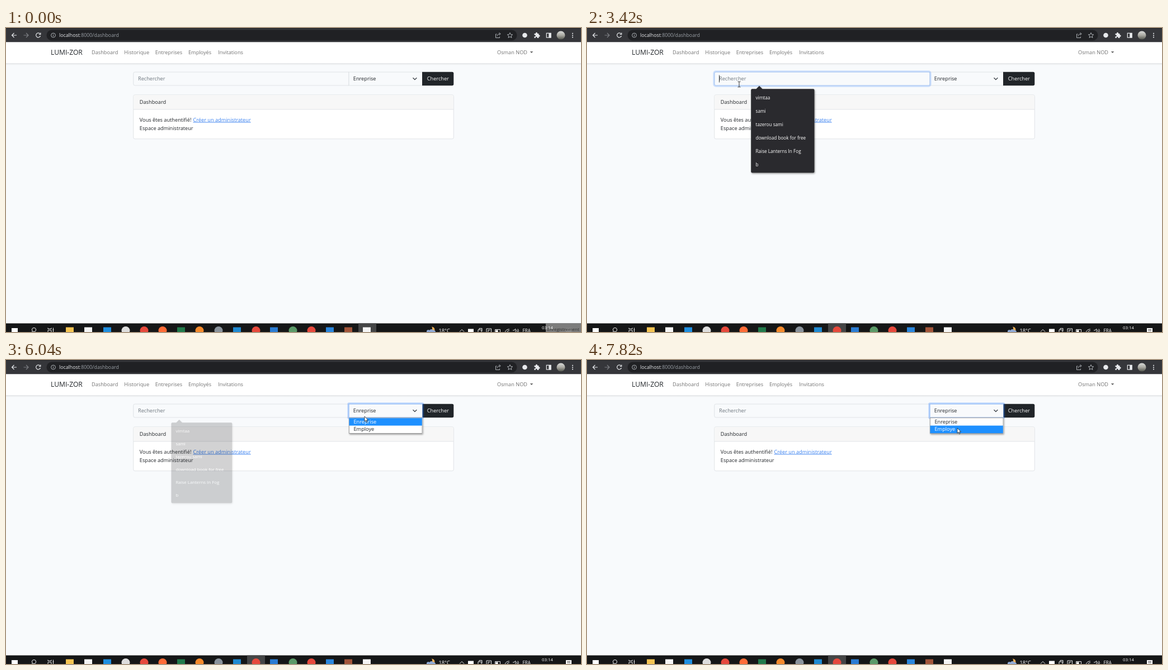
Recreate the animation shown at these times as an HTML page. Size 1028 px wide and 545 px high, loop 8000 ms.

```html
<!DOCTYPE html>
<html lang="fr">
<head>
<meta charset="utf-8">
<title>Dashboard</title>
<style>
html, body { margin: 0; width: 100%; height: 100%; overflow: hidden; background: #f8fafc; }
svg { display: block; width: 1028px; height: 545px; }
text { font: 9.2px "Open Sans", "Noto Sans", sans-serif; fill: #212529; white-space: pre; }
.brand { font-size: 12.1px; }
.nav text { fill: #737373; }
.url { font-size: 8.8px; fill: #9aa0a6; }
.hint { fill: #6c757d; }
.light, .light text { fill: #fff; }
.small text, text.small { font-size: 8.2px; }
.line { fill: none; stroke: #e8eaed; stroke-width: 1.2; }
.thin { fill: none; stroke: #fff; stroke-width: .9; }
.edge { stroke: #d5d9dd; stroke-width: .7; }
.ring rect { fill: none; stroke: #86b7fe; stroke-width: .8; }
.ring rect:first-child { stroke: rgba(13, 110, 253, .25); stroke-width: 2.7; }

/* Hard switches */
.cut { animation: 8s step-end infinite; }
#record { animation-name: record; }
#browser { animation-name: browser; }
#arrow { animation-name: arrow; }
#beam { animation-name: beam; }
#halo { animation-name: halo; }
#selection { animation-name: selection; }
#caret { animation-name: caret; }
#popup { animation-name: popup; }
#options { animation-name: options; }
#first { animation-name: first; }
#second { animation-name: second; }

/* Continuous motion */
.run { animation: 8s linear infinite; }
#pointer { animation-name: pointer; }
#reach { animation-name: reach; }
#inputRing { animation-name: inputRing; }
#selectRing { animation-name: selectRing; }
#history { animation-name: history; transform-origin: 350px 184px; }

@keyframes record { 0% { opacity: 1 } 4%, 100% { opacity: 0 } }
@keyframes browser { 0% { transform: translateX(199px) } 24.375%, 100% { transform: none } }
@keyframes arrow {
  0% { opacity: 0 } .875% { opacity: 1 } 20.5% { opacity: 0 } 33.7% { opacity: 1 }
  40.3% { opacity: 0 } 70.9% { opacity: 1 } 100% { opacity: 1 }
}
@keyframes beam {
  0% { opacity: 0 } 20.5% { opacity: 1 } 33.7% { opacity: 0 }
  40.3% { opacity: 1 } 70.9%, 100% { opacity: 0 }
}
@keyframes halo {
  0% { opacity: 0 } 24.375% { opacity: .65 } 30.2% { opacity: 0 } 40.5% { opacity: .65 }
  42.1% { opacity: 0 } 55.2% { opacity: .65 } 57.75% { opacity: 0 }
  73% { opacity: .65 } 74.9%, 100% { opacity: 0 }
}
@keyframes selection { 0% { opacity: 0 } 24.375% { opacity: 1 } 40.5%, 100% { opacity: 0 } }
@keyframes caret {
  0% { opacity: 0 } 41% { opacity: 1 } 47.625% { opacity: 0 } 54.2% { opacity: 1 }
  61.875% { opacity: 0 } 68.4% { opacity: 1 } 72.9%, 100% { opacity: 0 }
}
@keyframes popup { 0% { opacity: 0 } 73.6%, 100% { opacity: 1 } }
@keyframes options { 0% { opacity: 0 } 74.6%, 100% { opacity: 1 } }
@keyframes first { 0% { opacity: 1 } 80.9% { opacity: 0 } 86.9% { opacity: 1 } 90.8%, 100% { opacity: 0 } }
@keyframes second { 0% { opacity: 0 } 80.9% { opacity: 1 } 86.9% { opacity: 0 } 90.8%, 100% { opacity: 1 } }

@keyframes pointer {
  0%, .875% { transform: translate(1012px, 536px) }
  3% { transform: translate(925px, 360px) }
  6.75%, 9.2% { transform: translate(782px, 156px) }
  11%, 13.3% { transform: translate(375px, 261px) }
  17.5% { transform: translate(285px, 212px) }
  21.875%, 24.375% { transform: translate(241px, 181px) }
  28.625% { transform: translate(331px, 186px) }
  30.25%, 33.4% { transform: translate(335.5px, 181.5px) }
  34.375%, 36.8% { transform: translate(344px, 194px) }
  40.5% { transform: translate(275px, 100px) }
  42.75%, 47.6% { transform: translate(272px, 101px) }
  52% { transform: translate(278px, 96px) }
  55.2%, 66% { transform: translate(280px, 97px) }
  68% { transform: translate(390px, 95px) }
  70.9% { transform: translate(614px, 98px) }
  73%, 78.6% { transform: translate(641px, 101px) }
  82.75% { transform: translate(660px, 125px) }
  84.4% { transform: translate(661px, 125.5px) }
  87.875%, 89.4% { transform: translate(661px, 114px) }
  92.5% { transform: translate(662px, 120px) }
  97.75%, 100% { transform: translate(662px, 122px) }
}
@keyframes reach {
  0%, 24.375% { width: 0 } 28.625% { width: 87px } 30.25%, 100% { width: 96.5px }
}
@keyframes inputRing { 0%, 40.7% { opacity: 0 } 43.5%, 73.2% { opacity: 1 } 75.2%, 100% { opacity: 0 } }
@keyframes selectRing { 0%, 73.2% { opacity: 0 } 75.4%, 100% { opacity: 1 } }
@keyframes history {
  0%, 41.1% { opacity: 0; transform: none } 42.5%, 72.75% { opacity: 1; transform: none }
  76.25%, 100% { opacity: 0; transform: scale(.95) }
}
</style>
</head>
<body>
<svg viewBox="0 0 1028 545">
  <defs>
    <linearGradient id="photo" x2="0" y2="1">
      <stop stop-color="#d8dad8"/><stop offset=".5" stop-color="#aaa9a2"/><stop offset="1" stop-color="#55584f"/>
    </linearGradient>
    <linearGradient id="navShade" x2="0" y2="1">
      <stop stop-color="#000" stop-opacity=".09"/><stop offset="1" stop-color="#000" stop-opacity="0"/>
    </linearGradient>
    <filter id="drop" x="-10%" y="-30%" width="120%" height="170%">
      <feDropShadow dx="1" dy="1.5" stdDeviation="1.5" flood-opacity=".4"/>
    </filter>
    <clipPath id="span"><rect id="reach" class="run" x="239" y="172.5" width="0" height="15.5"/></clipPath>
  </defs>

  <!-- Browser bar -->
  <rect width="1028" height="25.5" fill="#35363a"/>
  <rect width="1028" height="1" fill="#222326"/>
  <rect x="72.5" y="3.5" width="841" height="19" rx="9.5" fill="#202124"/>
  <g class="line">
    <path d="M19 13H10.5M14.5 9l-4 4 4 4"/>
    <path d="M31.500 13H40M36 9l4 4-4 4" stroke="#7d7f83"/>
    <path d="M60.800 10.400A4 4 0 1 0 61.500 14M61.800 8.500v3h-3"/>
    <g stroke="#bdc1c6" stroke-width=".9">
      <circle cx="84.500" cy="13" r="3.900"/><path d="M84.500 12.400v2.600M84.500 10.700v1"/>
      <path d="M877.500 11H875.500v6.500h7V15.500M878 14.500q.5-4 5.500-4M881.500 8l2.500 2.500-2.500 2.500"/>
      <path d="M901 8.500l1.400 3.100 3.300.3-2.500 2.200.8 3.300-3-1.800-3 1.800.8-3.300-2.500-2.200 3.300-.3z"/>
    </g>
    <rect x="966.300" y="9.300" width="7.800" height="7.800"/>
  </g>
  <g fill="#e8eaed">
    <circle cx="927.500" cy="13" r="4.300"/>
    <path d="M944.500 10h2.500a1.600 1.600 0 1 1 3 0h2.500v2.600a1.600 1.600 0 1 1 0 3V18h-3a1.500 1.500 0 1 0-2.600 0h-2.400v-3a1.500 1.500 0 1 0 0-2.500z"/>
    <rect x="970.300" y="9" width="4.200" height="8.400"/>
    <circle cx="1013" cy="9.800" r="1.050"/><circle cx="1013" cy="13.200" r="1.050"/><circle cx="1013" cy="16.600" r="1.050"/>
  </g>
  <circle cx="992" cy="13" r="7.500" fill="url(#photo)"/>
  <text class="url" x="95" y="16.300"><tspan fill="#e8eaed">localhost</tspan>:8000/dashboard</text>

  <!-- Site header -->
  <rect y="63" width="1028" height="4" fill="url(#navShade)"/>
  <rect y="25.500" width="1028" height="37.500" fill="#fff"/>
  <text class="brand" x="80" y="47.800">LUMI-ZOR</text>
  <g class="nav">
    <text x="153" y="47.200">Dashboard</text>
    <text x="211.300" y="47.200">Historique</text>
    <text x="266.800" y="47.200">Entreprises</text>
    <text x="326" y="47.200">Employés</text>
    <text x="379.300" y="47.200">Invitations</text>
    <text x="932" y="47.200" text-anchor="end">Osman NOD</text>
    <path d="M936.800 42h5.600l-2.800 2.900z" fill="#666"/>
  </g>

  <!-- Search row -->
  <path class="edge" d="M613 79H230.500a2.700 2.700 0 0 0-2.700 2.700v18.600a2.700 2.700 0 0 0 2.700 2.700H613z" fill="#f8fafc"/>
  <rect class="edge" x="613" y="79" width="131.500" height="24" fill="#f8fafc"/>
  <path d="M744 78.700h53.600a2.700 2.700 0 0 1 2.700 2.700v19.200a2.700 2.700 0 0 1-2.700 2.700H744z" fill="#212529"/>
  <text class="hint" x="236" y="94">Rechercher</text>
  <text class="light" x="752.800" y="94">Chercher</text>

  <!-- Card -->
  <rect class="edge" x="227.800" y="119.800" width="572.500" height="79" rx="2.700" fill="#fff"/>
  <path d="M228.200 145.800v-23.300a2.300 2.300 0 0 1 2.300-2.300h567a2.300 2.300 0 0 1 2.300 2.300v23.300z" fill="#f7f7f7"/>
  <path class="edge" d="M228 146H800"/>
  <text x="238.800" y="136">Dashboard</text>
  <text x="238.800" y="167.600">Vous êtes authentifié!</text>
  <text x="334.500" y="167.600" style="fill:#3b82f0;text-decoration:underline">Créer un administrateur</text>
  <text x="238.800" y="183.300">Espace administrateur</text>
  <g id="selection" class="cut">
    <g clip-path="url(#span)">
      <rect x="239" y="172.500" width="97" height="15.500" fill="#3390ff"/>
      <text class="light" x="238.800" y="183.300">Espace administrateur</text>
    </g>
  </g>

  <!-- Focus states -->
  <g id="inputRing" class="ring run">
    <rect x="226.700" y="77.600" width="387.600" height="26.800" rx="3.500"/>
    <rect x="228" y="79" width="385" height="24" rx="2.500"/>
  </g>
  <g id="selectRing" class="ring run">
    <rect x="611.700" y="77.600" width="134.300" height="26.800" rx="1.500"/>
    <rect x="613" y="79" width="131.700" height="24"/>
  </g>
  <text x="620.800" y="94">Enreprise</text>
  <path d="M727.500 89.300l3.400 3.400 3.400-3.400" fill="none" stroke="#343a40" stroke-width="1.300"/>
  <rect id="caret" class="cut" x="236" y="84.500" width=".9" height="13" fill="#212529"/>

  <!-- Input history -->
  <g id="history" class="run light small">
    <path d="M295 109.300h7.500l5.500-5.500 5.500 5.500H404.500a2 2 0 0 1 2 2V257.500a2 2 0 0 1-2 2H295.200a2 2 0 0 1-2-2V111.300a2 2 0 0 1 2-2z" fill="#292a2d" filter="url(#drop)"/>
    <text x="301.500" y="127.600">vimtaa</text>
    <text x="301.500" y="151.600">sami</text>
    <text x="301.500" y="175.700">tazerou sami</text>
    <text x="301.500" y="199.700">download book for free</text>
    <text x="301.500" y="223.800">Raise Lanterns In Fog</text>
    <text x="301.500" y="247.800">b</text>
  </g>

  <!-- Select list -->
  <g id="popup" class="cut">
    <rect x="613" y="103.500" width="131.500" height="28.500" fill="#f9fbfc" filter="url(#drop)"/>
    <g id="options" class="cut">
      <rect x="613.300" y="103.800" width="130.700" height="27.800" fill="#fff" stroke="#767676" stroke-width=".7"/>
      <text x="621.500" y="113.600">Enreprise</text>
      <text x="621.500" y="127.200">Employe</text>
      <g id="first" class="cut">
        <rect x="613.500" y="104.200" width="130.300" height="13.400" fill="#1e90ff"/>
        <text class="light" x="621.500" y="113.600">Enreprise</text>
      </g>
      <g id="second" class="cut">
        <rect x="613.500" y="117.600" width="130.300" height="13.600" fill="#1e90ff"/>
        <text class="light" x="621.500" y="127.200">Employe</text>
      </g>
    </g>
  </g>

  <!-- Taskbar -->
  <rect y="529.500" width="1028" height="16" fill="#151617"/>
  <rect id="browser" class="cut" x="431" y="529.500" width="32" height="16" fill="#444546"/>
  <rect x="10" y="538" width="11" height="11" fill="#fff"/>
  <g class="thin">
    <circle cx="50" cy="541" r="3.600"/><path d="M47.500 543.500l-3 3"/>
    <path d="M75 537.500v2h6v-2M75 546v-4h6v4M84.500 537.500v8M83.500 541h2"/>
  </g>
  <g id="apps"></g>
  <circle cx="761" cy="541" r="5.500" fill="#e9ad57"/>
  <circle cx="758" cy="538.500" r="4" fill="#151617"/>
  <path d="M752 545a3 3 0 0 1 5-3 4 4 0 0 1 7 0 3 3 0 0 1 4 3z" fill="#8fa9d4"/>
  <text class="light" x="773.500" y="546.300">18°C</text>
  <text class="light small" x="923.500" y="546">FRA</text>
  <g class="thin">
    <path d="M811 544.500l4-4 4 4M844 546v-5h6v5M846 541v-2.500h5v5"/>
    <path d="M859 546v-7h8.500v7M862 545v-3.500h3.500M874.500 546v-5.500h9v5.500"/>
    <path d="M892 546a8 8 0 0 1 8-6M895 546a5 5 0 0 1 5-3.500"/>
    <path d="M906 542h2l3-2.500v6M913 541q2 2.500 0 5M915 539.500q3 3.500 0 6.500"/>
  </g>
  <path d="M826 539.500h10v6h-10zM875.500 541.500h4v4h-4zM1001 538h10v8h-10z" fill="#fff"/>
  <path d="M1003 540.500h6M1003 542.800h6" stroke="#222" stroke-width=".8"/>
  <g id="record" class="cut">
    <rect x="965" y="530" width="63" height="15" fill="#858585" opacity=".93"/>
    <text x="967.500" y="543" style="font-size:8px;fill:#333">Enregistrement</text>
  </g>
  <text class="light small" x="958" y="539.800" style="font-size:7.800px">03:14</text>

  <!-- Pointer -->
  <g id="pointer" class="run">
    <circle id="halo" class="cut" cx="-.5" cy="0" r="7.500" fill="#ffee00"/>
    <path id="arrow" class="cut" d="M0 0V9.200L2.100 7.300l1.500 3.400 1.400-.6-1.500-3.300h3z" fill="#fff" stroke="#111" stroke-width=".7"/>
    <path id="beam" class="cut" d="M-2.500-4.800h1.800l.7.600.7-.6h1.800M0-4.500v9M-2.500 4.800h1.800l.7-.6.7.6h1.800" fill="none" stroke="#222" stroke-width=".9"/>
  </g>
</svg>
<script>
// Taskbar buttons: centre, colour, round or square
const apps = [
  [114, '#f4c453'], [147, '#f4f4f4'], [181, '#1f8fe0'], [214, '#dddddd', 1], [247, '#e6493c', 1],
  [280, '#ff6c37', 1], [313, '#217a4b'], [346, '#f58a2c', 1], [380, '#8a939c', 1], [413, '#1f8ad2'],
  [447, '#e6493c', 1], [479, '#2b7cd3'], [513, '#5b9a68', 1], [546, '#e6493c', 1], [579, '#2a86dd'],
  [612, '#a3563a'], [645, '#f4f4f4']
];
document.getElementById('apps').innerHTML = apps.map(([x, fill, round]) => round
  ? `<circle cx="${x}" cy="542.500" r="7.500" fill="${fill}"/>`
  : `<rect x="${x - 7}" y="536.500" width="14" height="14" fill="${fill}"/>`).join('');
</script>
</body>
</html>
```
